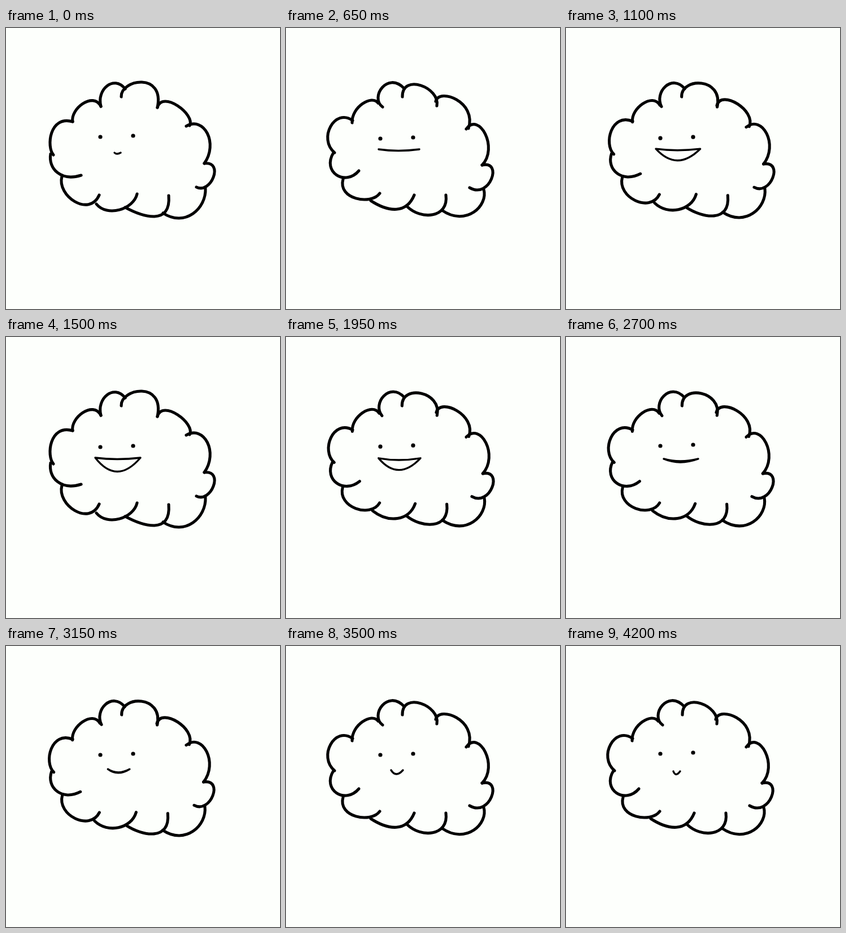
An HTML page with a canvas for the animation above (4.4 s loop, 485 px wide and 498 px high).

```html
<!DOCTYPE html>
<html lang="en">
<head>
<meta charset="utf-8">
<title>Smiling cloud</title>
<style>
  html, body { margin: 0; width: 100%; height: 100%; overflow: hidden; background: #fdfffc; }
  canvas { display: block; }
</style>
</head>
<body>
<canvas width="485" height="498"></canvas>
<script>
const LOOP = 4400, BEAT = 50;
const ctx = document.querySelector('canvas').getContext('2d');
const mix = (a, b, k) => a + (b - a) * k;

// Each line is one bump: start, two points on the way, end.
const parseBumps = text => text.trim().split('\n').map(line => line.match(/\d+/g).map(Number));

const firstCloud = parseBumps(`
  118 166, 88 173, 78 201, 84 225
  79 223, 83 247, 102 262, 133 261
  118 166, 126 143, 148 129, 168 139
  168 139, 171 112, 189 98, 211 108
  204 122, 223 99, 257 101, 268 141
  268 141, 289 131, 317 149, 325 173
  319 174, 347 175, 361 203, 351 240
  351 240, 369 252, 360 276, 337 282
  353 284, 343 317, 315 336, 278 328
  288 297, 277 330, 246 332, 211 318
  232 294, 215 316, 186 324, 160 312
  165 296, 138 313, 108 296, 99 263`);

const lastCloud = parseBumps(`
  118 164, 89 163, 74 190, 86 221
  84 221, 81 251, 102 265, 129 253
  117 168, 126 143, 146 129, 163 133
  171 140, 164 117, 181 98, 209 107
  206 122, 223 100, 254 110, 267 138
  265 130, 286 121, 316 139, 323 178
  319 179, 343 175, 358 206, 347 243
  347 243, 366 254, 355 280, 325 283
  350 286, 344 315, 316 333, 276 323
  283 296, 273 325, 244 331, 214 316
  227 296, 208 318, 181 320, 150 306
  166 293, 140 304, 110 295, 101 268`);

// Four poses, the middle two drawn between the first and the last.
const POSES = 4;
const cloudPose = pose => firstCloud.map((bump, i) =>
  bump.map((value, j) => mix(value, lastCloud[i][j], pose / (POSES - 1))));

// A pose lasts 200 ms at first; later five poses share 900 ms.
function poseAt(t) {
  if (t < 1200) return Math.floor(t / 200) % POSES;
  const round = Math.floor((t - 1200) / 900);
  const u = (t - 1200) % 900;
  return (6 + 5 * round + Math.floor(Math.min(u / 150, u / 200 + 0.5))) % POSES;
}

const smallMouth = { eyeY: 193, left: 192, right: 203, y: 221, upper: 4, lower: 4 };
const wideLine = { eyeY: 196, left: 164, right: 236, y: 215, upper: 5, lower: 5 };
const openSmile = { eyeY: 195, left: 158, right: 238, y: 214, upper: 5, lower: 49 };
const halfSmile = { eyeY: 193, left: 172, right: 238, y: 216, upper: 8, lower: 31 };
const closedSmile = { eyeY: 193, left: 173, right: 234, y: 216, upper: 8, lower: 12 };
const softSmile = { eyeY: 193, left: 186, right: 207, y: 220, upper: 14, lower: 14 };
const tinySmile = { eyeY: 191, left: 190, right: 202, y: 222, upper: 11, lower: 11 };

const faceKeys = [
  [0, smallMouth], [650, wideLine], [1200, openSmile], [1700, openSmile],
  [2300, halfSmile], [2700, closedSmile], [3500, softSmile], [4200, tinySmile], [LOOP, tinySmile]
];

function faceAt(t) {
  const next = faceKeys.findIndex(([time]) => time > t);
  const [start, from] = faceKeys[next - 1], [end, to] = faceKeys[next];
  const face = {};
  for (const key in from) face[key] = mix(from[key], to[key], (t - start) / (end - start));
  return face;
}

// The cubic curve that passes through both inner points at one and two thirds.
function drawBump([ax, ay, bx, by, cx, cy, dx, dy]) {
  const handle = (a, b, c, d) => (-5 * a + 18 * b - 9 * c + 2 * d) / 6;
  ctx.beginPath();
  ctx.moveTo(ax, ay);
  ctx.bezierCurveTo(handle(ax, bx, cx, dx), handle(ay, by, cy, dy),
    handle(dx, cx, bx, ax), handle(dy, cy, by, ay), dx, dy);
  ctx.stroke();
}

function drawEye(x, y) {
  ctx.beginPath();
  ctx.arc(x, y, 3.6, 0, 2 * Math.PI);
  ctx.fill();
}

function drawMouth({ left, right, y, upper, lower }) {
  const middle = (left + right) / 2 - 2;
  ctx.beginPath();
  ctx.moveTo(left, y);
  ctx.quadraticCurveTo(middle, y + upper, right, y);
  ctx.quadraticCurveTo(middle, y + lower, left, y);
  ctx.stroke();
}

function draw() {
  const t = performance.now() % LOOP;
  const face = faceAt(Math.floor(t / BEAT) * BEAT);
  ctx.fillStyle = '#fdfffc';
  ctx.fillRect(0, 0, 485, 498);
  ctx.fillStyle = ctx.strokeStyle = '#000';
  ctx.lineCap = ctx.lineJoin = 'round';
  ctx.lineWidth = 5.1;
  cloudPose(poseAt(t)).forEach(drawBump);
  drawEye(167, face.eyeY);
  drawEye(225, face.eyeY - 2);
  ctx.lineWidth = 3.4;
  drawMouth(face);
  requestAnimationFrame(draw);
}
draw();
</script>
</body>
</html>
```
